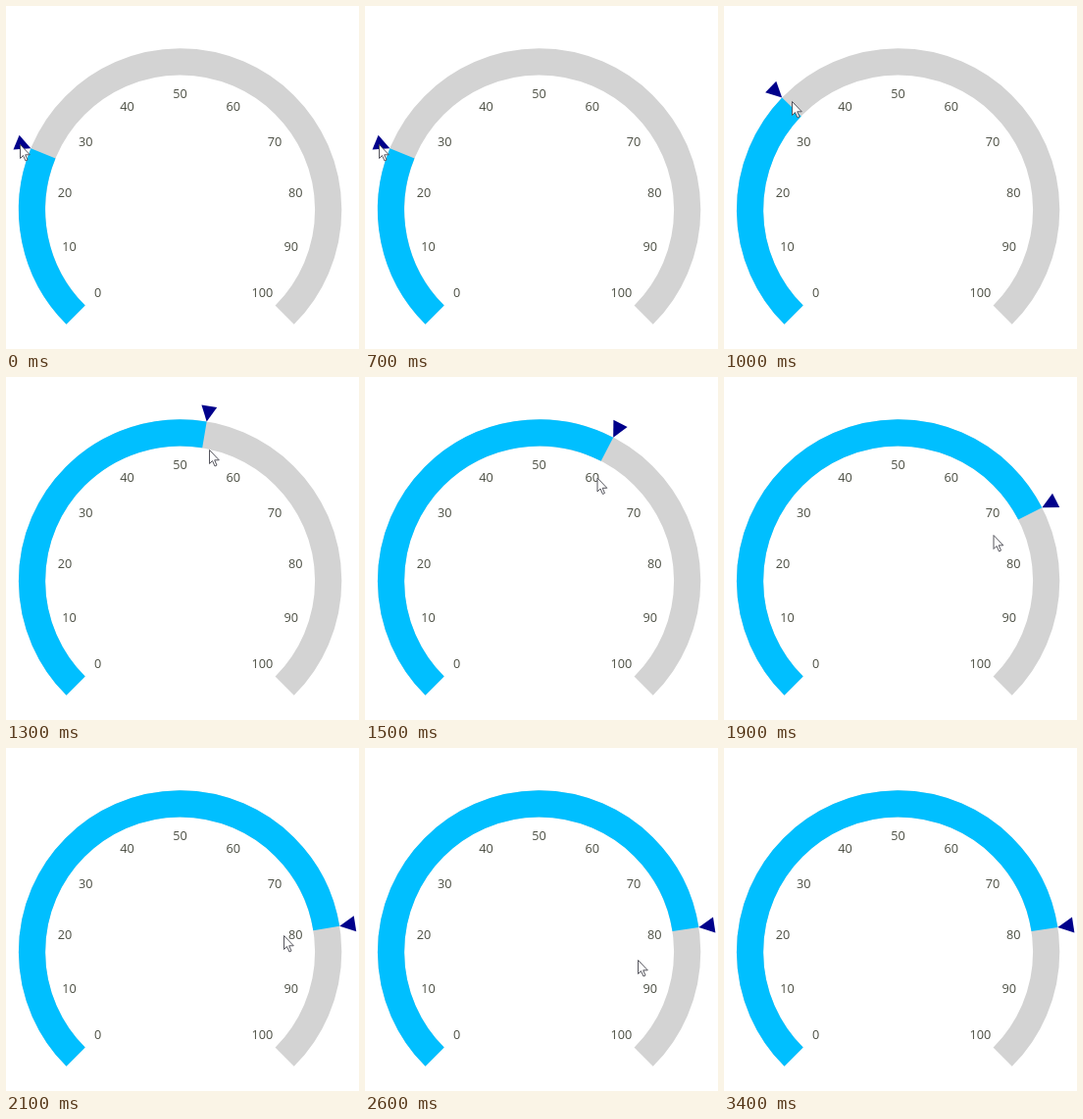
These frames come from a looping animation (360 by 350 pixels, 3.5 s). An HTML page with a canvas:

```html
<!DOCTYPE html>
<html lang="en">
<head>
<meta charset="utf-8">
<title>Radial gauge</title>
<style>
  html, body { margin: 0; overflow: hidden; background: #fff; }
  canvas { display: block; }
</style>
</head>
<body>
<canvas width="360" height="350"></canvas>
<script>
const ctx = document.querySelector('canvas').getContext('2d');
const LOOP = 3500, STEP = 100;
const CX = 177.6, CY = 208, OUTER = 164.7, INNER = 137.5, LABELS = 119;

// The pointer grabs the marker, drags it along the rim, lets go and leaves.
const path = [
  { time: 700, value: 25, x: 15, y: 141 },
  { time: 1000, value: 33, x: 70, y: 97 },
  { time: 1300, value: 53.5, x: 208, y: 74 },
  { time: 1700, value: 66.7, x: 267, y: 131 },
  { time: 2100, value: 79.9, x: 284, y: 191 },
  { time: 2600, value: 80.05, x: 279, y: 216 },
  { time: 2900, value: 80.05, x: 277, y: 372 }
];

const angleOf = value => (134.8 + value * 2.704) * Math.PI / 180;

function poseAt(time) {
  const next = path.findIndex(p => p.time > time);
  if (next === 0) return path[0];
  if (next < 0) return path[path.length - 1];
  const a = path[next - 1], b = path[next];
  const k = (time - a.time) / (b.time - a.time);
  const mix = key => a[key] + (b[key] - a[key]) * k;
  return { value: mix('value'), x: mix('x'), y: mix('y') };
}

function band(value, color) {
  ctx.beginPath();
  ctx.arc(CX, CY, (OUTER + INNER) / 2, angleOf(0), angleOf(value));
  ctx.lineWidth = OUTER - INNER;
  ctx.strokeStyle = color;
  ctx.stroke();
}

function drawLabels() {
  ctx.font = '12.7px "Open Sans", "Noto Sans", sans-serif';
  ctx.textAlign = 'center';
  ctx.fillStyle = '#4c4f44';
  for (let n = 0; n <= 100; n += 10) {
    const a = angleOf(n);
    ctx.fillText(n, CX + LABELS * Math.cos(a), Math.round(CY + 5 + LABELS * Math.sin(a)));
  }
}

function drawMarker(value) {
  ctx.save();
  ctx.translate(CX, CY);
  ctx.rotate(angleOf(value));
  ctx.fillStyle = '#00008b';
  ctx.fill(new Path2D(`M${OUTER} 0l16 -8v16z`));
  ctx.restore();
}

function drawCursor(x, y) {
  const arrow = new Path2D('M0 0v14l3-3 2.5 5.5 2-1-2.3-5.2h4.6z');
  ctx.save();
  ctx.translate(x - 0.5, y + 0.5);
  ctx.fillStyle = '#fff';
  ctx.fill(arrow);
  ctx.lineWidth = 1;
  ctx.strokeStyle = '#55555d';
  ctx.stroke(arrow);
  ctx.restore();
}

function draw(now) {
  const { value, x, y } = poseAt(Math.floor(now % LOOP / STEP) * STEP);
  ctx.clearRect(0, 0, 360, 350);
  band(100, '#d3d3d3');
  band(value, '#00bfff');
  drawLabels();
  drawMarker(value);
  drawCursor(x, y);
  requestAnimationFrame(draw);
}
draw(0);
</script>
</body>
</html>
```
